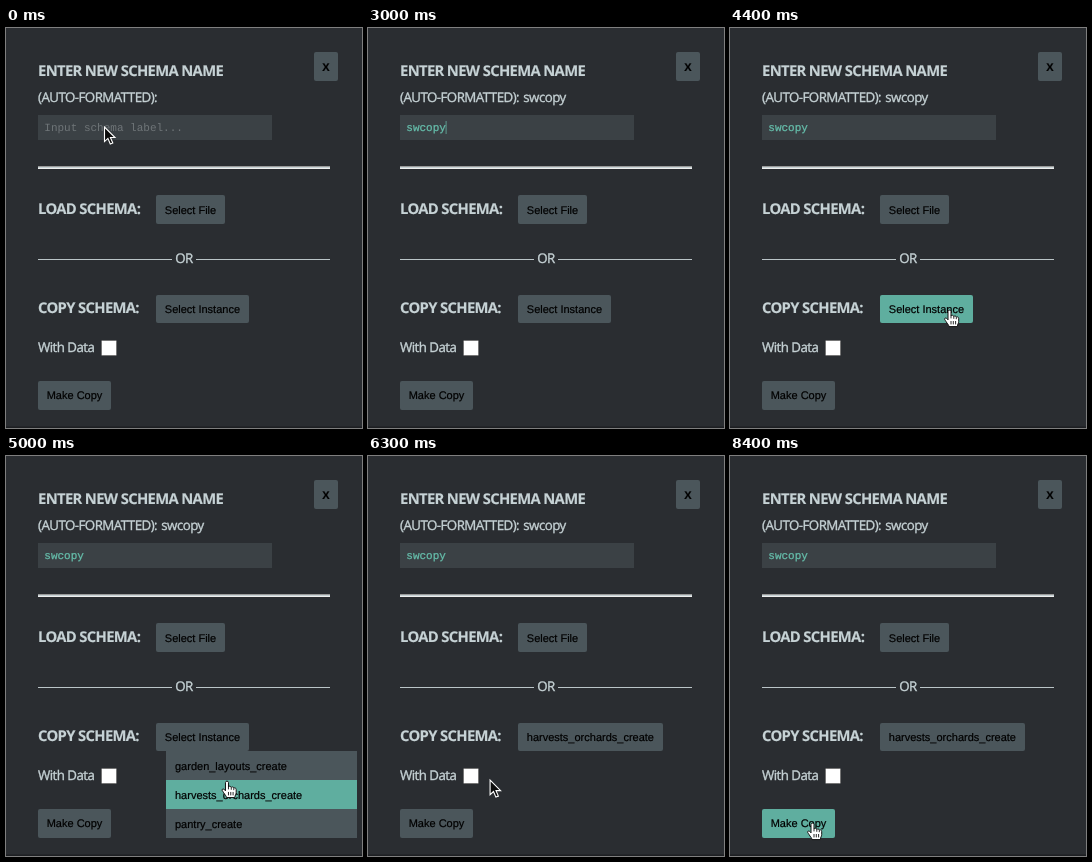
These frames come from a looping animation (356 by 400 pixels, 8.5 s). An HTML page:

```html
<!DOCTYPE html>
<html lang="en">
<head>
<meta charset="utf-8">
<title>New schema form</title>
<style>
  html, body { margin: 0; width: 100%; height: 100%; overflow: hidden; background: #2a2d31; }
  svg { display: block; width: 100vw; height: 100vh; text-rendering: geometricPrecision; }
  text { white-space: pre; }
  .head, .body { fill: #c6d2d5; stroke: #c6d2d5; }
  .head { font: 700 14.8px "Open Sans", "Noto Sans", sans-serif; letter-spacing: -.66px; stroke-width: .15; }
  .body { font: 400 13.3px "Open Sans", "Noto Sans", sans-serif; letter-spacing: -.54px; stroke-width: .35; }
  .label { font: 400 11px "Liberation Sans", Arial, sans-serif; fill: #000; stroke: #000; stroke-width: .2; }
  .bold { font-weight: 700; }
  .mono { font: 400 11px "Liberation Mono", "Courier New", monospace; }
  .btn { fill: #4b565b; }
  .on { fill: #5fae9f; }
  .line { fill: #bac4c7; }
</style>
</head>
<body>
<svg viewBox="0 0 356 400">
  <rect width="356" height="400" fill="#2a2d31"/>
  <rect y="398.5" width="356" height="1.5" fill="#1d1f22"/>

  <text class="head" x="32" y="47.8">ENTER NEW SCHEMA NAME</text>
  <rect class="btn" x="308" y="24" width="24" height="29" rx="2"/>
  <text class="label bold" x="316.3" y="43">X</text>

  <text class="body" x="32" y="74">(AUTO-FORMATTED):</text>
  <text class="body" id="echo" x="155.3" y="74"></text>
  <rect x="32" y="87" width="234" height="25" fill="#3b4145"/>
  <text class="mono" id="hint" x="38.3" y="103" fill="#6f7578">Input schema label...</text>
  <text class="mono" id="typed" x="38.3" y="103" fill="#66bfac" stroke="#66bfac" stroke-width=".25"></text>
  <rect id="caret" y="93" width="1" height="13" fill="#6cc0ae"/>

  <rect x="32" y="138" width="292" height="1" fill="#9a9a9a"/>
  <rect x="32" y="139" width="292" height="1" fill="#c6d2d5"/>
  <rect x="32" y="140" width="292" height="1" fill="#eee"/>
  <text class="head" x="32" y="185.8">LOAD SCHEMA:</text>
  <rect class="btn" id="load" x="150" y="167" width="69" height="29" rx="2"/>
  <text class="label" x="158.8" y="186">Select File</text>

  <rect class="line" x="32" y="231" width="134" height="1"/>
  <text class="body" x="169.3" y="235.3">OR</text>
  <rect class="line" x="190" y="231" width="134" height="1"/>

  <text class="head" x="32" y="284.8">COPY SCHEMA:</text>
  <rect class="btn" id="pick" x="150" y="267" width="93" height="28" rx="2"/>
  <text class="label" id="pickText" x="158.8" y="285"></text>

  <text class="body" x="32" y="324.3">With Data</text>
  <rect id="box" x="95.5" y="312.5" width="15" height="15" rx="1"/>
  <path id="tick" d="M98.7 320.2l3 3.2 5.6-6.6" fill="none" stroke="#fff" stroke-width="2"/>

  <rect class="btn" id="copy" x="32" y="353" width="73" height="29" rx="2"/>
  <text class="label" x="40.7" y="371">Make Copy</text>

  <g id="menu"></g>

  <g id="arrow">
    <path d="M.5 1V15.6L3.9 12.4 6.3 18 8.8 17 6.4 11.5H11Z" fill="#0b0b0b" stroke="#fff" stroke-width="1.1"/>
  </g>
  <g id="beam" fill="none">
    <path d="M-3-8.2Q0-8.2 0-6V6Q0 8.2-3 8.2M3-8.2Q0-8.2 0-6V6Q0 8.2 3 8.2" stroke="#e8eaea" stroke-width="2.4"/>
    <path d="M-3-8.2Q0-8.2 0-6V6Q0 8.2-3 8.2M3-8.2Q0-8.2 0-6V6Q0 8.2 3 8.2" stroke="#111"/>
  </g>
  <g id="hand" stroke="#111" stroke-linejoin="round">
    <path d="M-2 1.5C-2-.3 1-.3 1 1.5V6C1.2 4.8 3.6 5 3.8 6.6C4.2 5.4 6.2 5.8 6.3 7.3C6.8 6.4 8.7 6.8 8.7 8.6V11.5C8.7 13.5 7.4 14.2 7.4 16.6H-1C-1.2 14.7-2.8 13.7-3.8 11.8C-4.8 10-6 9.2-5.2 8.4C-4.2 7.5-2.8 8.6-2 9.8Z" fill="#fff"/>
    <path d="M1 6V8.4M3.8 6.8V8.8M6.3 7.4V9.2M1 11V14.4M3.3 11V14.4M5.6 11V14.4" stroke-width=".9"/>
  </g>
</svg>
<script>
const LOOP = 8500, STEP = 100;
const CHOICE = "harvests_orchards_create";
const ITEMS = ["garden_layouts_create", CHOICE, "pantry_create"];
const $ = id => document.getElementById(id);

// pointer: start, end, target x, target y
const MOVES = [
  [100, 600, 118.5, 98],
  [3500, 4400, 220, 282],
  [4600, 5200, 222, 340],
  [5700, 6500, 103, 320],
  [7800, 8400, 83, 367]
];
const TYPING = [[1300, "s"], [1600, "sw"], [1900, "swc"], [2000, "swco"], [2200, "swcop"], [2600, "swcopy"]];
const CARET = [[0, 0], [600, 1], [1000, .6], [1100, 0], [1300, 1], [3000, .7], [3100, 0], [3600, 1], [4100, 0]];

const lastOf = (table, t, first) => table.reduce((v, [at, value]) => t >= at ? value : v, first);
const ease = p => p * p * (3 - 2 * p);
const show = (el, yes) => el.setAttribute("visibility", yes ? "visible" : "hidden");

function add(parent, tag, attrs, text) {
  const el = document.createElementNS("http://www.w3.org/2000/svg", tag);
  for (const k in attrs) el.setAttribute(k, attrs[k]);
  if (text) el.textContent = text;
  parent.append(el);
  return el;
}

const rows = ITEMS.map((name, i) => {
  const y = 295 + i * 29;
  const row = add($("menu"), "rect", { class: "btn", x: 160, y, width: 191, height: 29 });
  add($("menu"), "text", { class: "label", x: 169, y: y + 18.5 }, name);
  return row;
});

function pointer(t) {
  let x = 98, y = 98;
  for (const [from, to, tx, ty] of MOVES) {
    const p = ease(Math.min(1, Math.max(0, (t - from) / (to - from))));
    x += (tx - x) * p;
    y += (ty - y) * p;
  }
  return [x, y];
}

function over(el, x, y) {
  const [l, top, w, h] = ["x", "y", "width", "height"].map(k => +el.getAttribute(k));
  return x >= l && x <= l + w && y >= top && y <= top + h;
}

function hover(el, x, y) {
  const hit = over(el, x, y);
  el.setAttribute("class", hit ? "btn on" : "btn");
  return hit;
}

function draw(t) {
  const [x, y] = pointer(t);
  const text = lastOf(TYPING, t, "");
  const open = t >= 4500 && t < 5500;
  const picked = t >= 5500;
  const checked = t >= 6900 && t < 7300;

  $("echo").textContent = $("typed").textContent = text;
  show($("hint"), !text);
  $("caret").setAttribute("x", 38 + text.length * 6.6);
  $("caret").setAttribute("opacity", lastOf(CARET, t, 0));

  $("pick").setAttribute("width", picked ? 145 : 93);
  $("pickText").textContent = picked ? CHOICE : "Select Instance";
  show($("menu"), open);

  const edge = over($("box"), x, y) ? "#4f4f4f" : "#767676";
  $("box").setAttribute("fill", checked ? "#2f7be0" : "#fff");
  $("box").setAttribute("stroke", checked ? "#2f7be0" : edge);
  show($("tick"), checked);

  const targets = [$("load"), $("pick"), $("copy"), ...(open ? rows : [])];
  const hits = targets.filter(el => hover(el, x, y));
  const hand = hits.length > 0 || (picked && t < 5800);
  const beam = !hand && t >= 200 && y < 112;
  const hidden = t >= 1300 && t < 3400;
  const kind = hidden ? "" : hand ? "hand" : beam ? "beam" : "arrow";
  for (const id of ["arrow", "beam", "hand"]) {
    show($(id), id === kind);
    $(id).setAttribute("transform", `translate(${x.toFixed(2)} ${y.toFixed(2)})`);
  }
}

const start = performance.now();
function tick() {
  const t = (performance.now() - start) % LOOP;
  draw(Math.floor(t / STEP) * STEP);
  requestAnimationFrame(tick);
}
tick();
</script>
</body>
</html>
```
